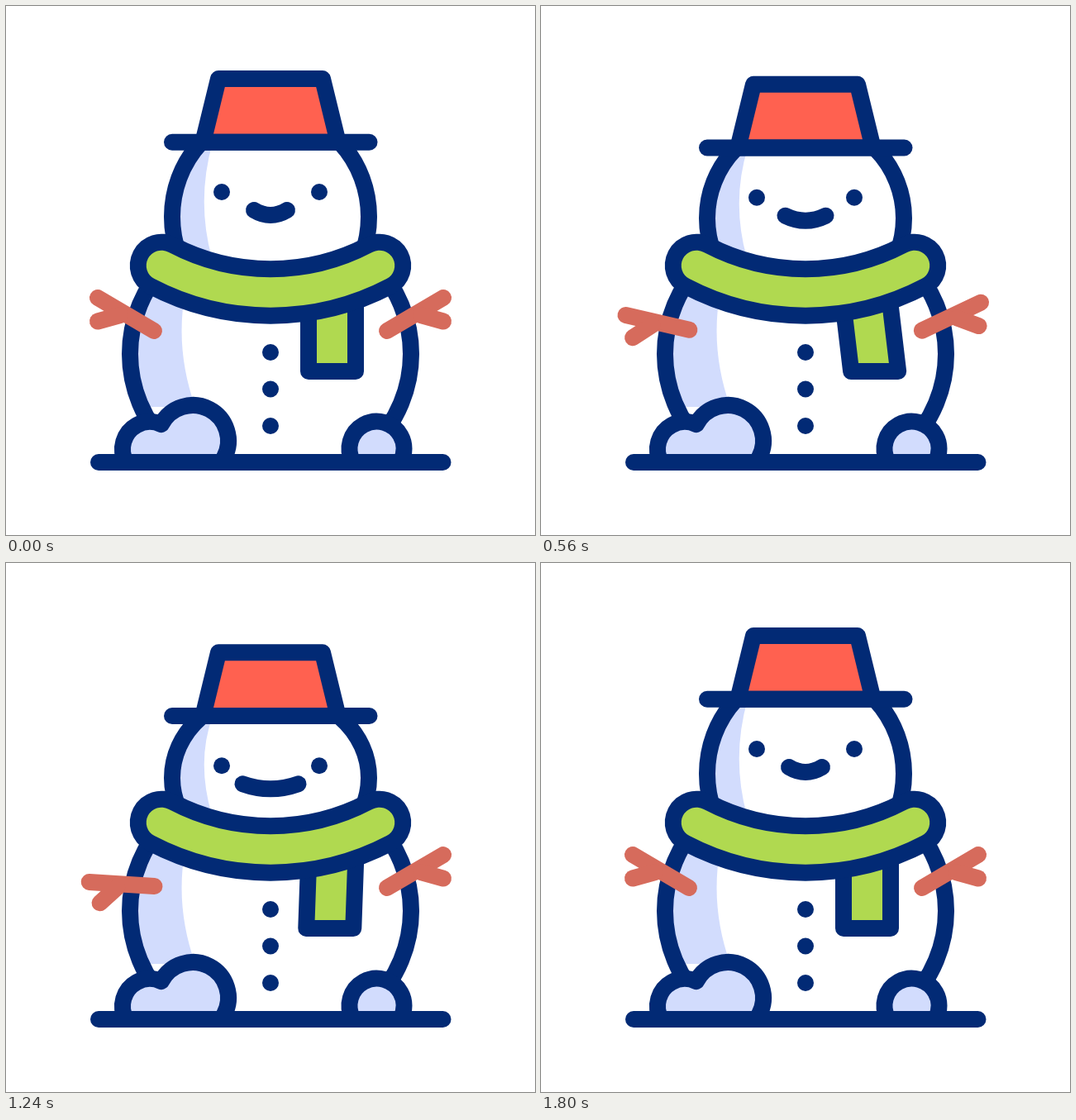
Animation of 640x640 px, one loop 1.96 s. Source, as an HTML page with a canvas:

```html
<!DOCTYPE html>
<html lang="en">
<head>
<meta charset="utf-8">
<title>Snowman</title>
<style>
  html, body { margin: 0; width: 100%; height: 100%; overflow: hidden; background: #fff; }
  canvas { display: block; width: 100vmin; height: 100vmin; }
</style>
</head>
<body>
<canvas id="stage"></canvas>
<script>
const SIZE = 640, LOOP = 1960, STEP = 40;
const NAVY = '#022a75', RED = '#ff6150', GREEN = '#b0d950', SHADE = '#d2dcfd', TWIG = '#d66b5c';

const canvas = document.getElementById('stage');
const ctx = canvas.getContext('2d');

// Tracks are [time, value] pairs, eased in and out between neighbours.
const SQUASH = [[140, 0], [1225, 1], [1340, 1], [1800, 0]];
const LEFT_ARM = [[380, 0], [680, 27], [980, 0], [1255, 27], [1580, 0]];
const RIGHT_ARM = [[110, 0], [380, 17], [660, 0], [980, 17], [1250, 0]];
const SWAY = [[100, 0], [540, 9.2], [1080, -5], [1420, 0]];

function valueAt(track, t) {
  if (t <= track[0][0]) return track[0][1];
  for (let i = 1; i < track.length; i++) {
    const [t0, a] = track[i - 1], [t1, b] = track[i];
    if (t < t1) {
      const u = (t - t0) / (t1 - t0);
      return a + (b - a) * u * u * (3 - 2 * u);
    }
  }
  return track[track.length - 1][1];
}

function paint(fill, stroke, width = 20) {
  if (fill) { ctx.fillStyle = fill; ctx.fill(); }
  if (stroke) { ctx.strokeStyle = stroke; ctx.lineWidth = width; ctx.stroke(); }
}

function poly(points, fill, stroke, closed) {
  ctx.beginPath();
  for (const [x, y] of points) ctx.lineTo(x, y);
  if (closed) ctx.closePath();
  paint(fill, stroke);
}

function dot(x, y) {
  ctx.beginPath();
  ctx.arc(x, y, 10, 0, 2 * Math.PI);
  paint(NAVY);
}

// A snowball cut off at top and bottom, shaded left of a curve.
function ball(cy, rx, ry, top, bottom, curve) {
  const [x0, y0, cx, cY, x1, y1] = curve;
  const outline = () => {
    ctx.beginPath();
    ctx.ellipse(320, cy, rx, ry, 0, 0, 2 * Math.PI);
  };
  ctx.save();
  ctx.beginPath();
  ctx.rect(0, top, SIZE, bottom - top);
  ctx.clip();
  outline();
  paint('#fff');
  ctx.save();
  ctx.clip();
  ctx.beginPath();
  ctx.moveTo(100, y0);
  ctx.lineTo(x0, y0);
  ctx.quadraticCurveTo(cx, cY, x1, y1);
  ctx.lineTo(100, y1);
  paint(SHADE);
  ctx.restore();
  outline();
  paint(null, NAVY);
  ctx.restore();
}

function mounds() {
  const foot = Math.asin(16 / 33);
  ctx.beginPath();
  ctx.arc(174, 536, 33, Math.PI - foot, Math.atan2(-30, 13.9));
  ctx.arc(226, 526, 43, Math.atan2(-20, -38.1), Math.asin(26 / 43));
  paint(SHADE, NAVY);
  ctx.beginPath();
  ctx.arc(448.5, 535.5, 33, Math.PI - foot, foot);
  paint(SHADE, NAVY);
  poly([[112, 552], [528.5, 552]], null, NAVY);
}

function arm(angle) {
  ctx.save();
  ctx.translate(175, 391);
  ctx.rotate(-angle * Math.PI / 180);
  poly([[4, 2], [-64, -38]], null, TWIG);
  poly([[-64, -9.5], [-37, -17]], null, TWIG);
  ctx.restore();
}

function scarf(sway) {
  const top = 365, base = 442;
  const lean = (x, y) => [x + sway * (y - top) / (base - top), y];
  poly([lean(366, 345), lean(366, base), lean(423, base), lean(423, 345)], GREEN, NAVY, true);
  const half = Math.asin(132 / 284);
  ctx.beginPath();
  ctx.arc(320, 62.5, 284, Math.PI / 2 - half, Math.PI / 2 + half);
  paint(null, NAVY, 76.5);
  paint(null, GREEN, 36.5);
}

function faceAndHat(p) {
  ctx.save();
  ctx.translate(0, 20.3 * p);
  poly([[238.3, 164.7], [257, 88], [383, 88], [401.7, 164.7]], RED, NAVY, true);
  poly([[201, 164.7], [439.5, 164.7]], null, NAVY);
  dot(261, 225);
  dot(379, 225);
  const w = 20 + 13.5 * p;
  ctx.beginPath();
  ctx.moveTo(320 - w, 247);
  ctx.quadraticCurveTo(320, 259, 320 + w, 247);
  paint(null, NAVY);
  ctx.restore();
}

function draw(t) {
  const scale = canvas.width / SIZE;
  ctx.setTransform(scale, 0, 0, scale, 0, 0);
  ctx.fillStyle = '#fff';
  ctx.fillRect(0, 0, SIZE, SIZE);
  ctx.lineCap = ctx.lineJoin = 'round';

  const p = valueAt(SQUASH, t);
  const brim = 165 + 20.3 * p;
  ball(421, 170, 162, 330, 545, [217, 345, 204, 415, 229, 485]);
  ball(255 + 5 * p, 119, 127 - 23 * p, brim, 312, [250, brim, 230, 235 + 5 * p, 249, 305]);
  mounds();
  for (const y of [419, 463.5, 508]) dot(320, y);
  scarf(valueAt(SWAY, t));
  faceAndHat(p);

  arm(valueAt(LEFT_ARM, t));
  ctx.translate(SIZE, 0);
  ctx.scale(-1, 1);
  arm(valueAt(RIGHT_ARM, t));
}

function resize() {
  const side = Math.min(innerWidth, innerHeight) || SIZE;
  canvas.width = canvas.height = Math.round(side * (devicePixelRatio || 1));
}

const start = performance.now();
function tick() {
  const t = (performance.now() - start) % LOOP;
  draw(Math.floor(t / STEP) * STEP);
  requestAnimationFrame(tick);
}

addEventListener('resize', resize);
resize();
tick();
</script>
</body>
</html>
```
